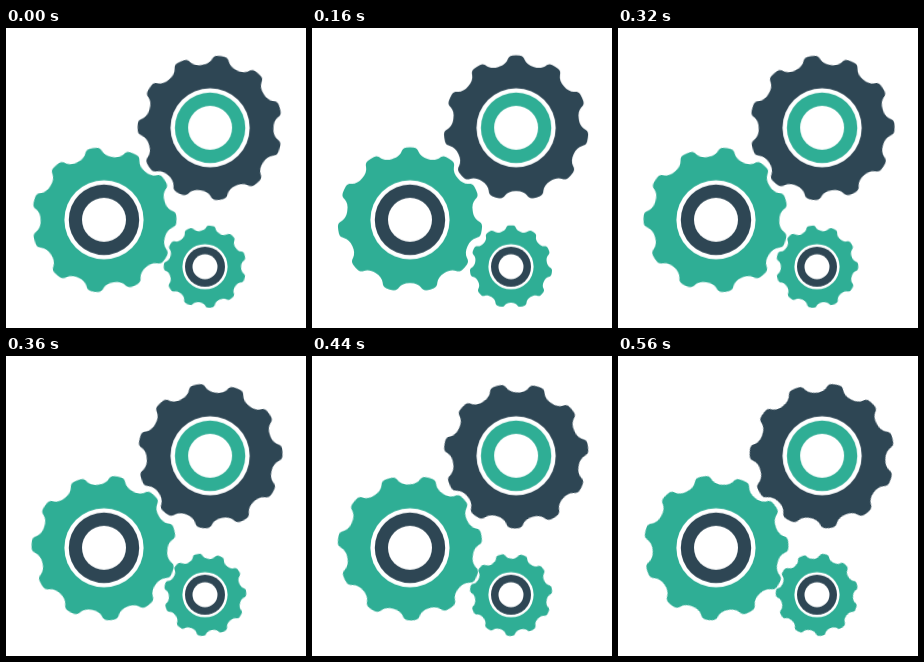
Write an HTML page that moves like this. It is 300x300 px and loops after 0.6 s.

```html
<!DOCTYPE html>
<html lang="en">
<head>
<meta charset="utf-8">
<title>Gears</title>
<style>
  html, body { margin: 0; width: 100%; height: 100%; overflow: hidden; background: #fff; }
  svg { display: block; width: 100vw; height: 100vh; }
  .wheel { transform-origin: 0 0; }
</style>
</head>
<body>
<svg id="stage" viewBox="0 0 300 300"></svg>
<script>
const DARK = '#2e4654', GREEN = '#2fae95', WHITE = '#fff';
const TEETH = 11, PITCH = 360 / TEETH, LOOP = 600, STEPS = 15;
const PHASE = PITCH * 4 / STEPS; // a tooth points straight up after four steps

const gears = [
  { x: 98, y: 191.8, r: 72.4, body: GREEN, ring: DARK, radii: [39.6, 35.2, 22], dir: 1 },
  { x: 204.1, y: 99.8, r: 72.4, body: DARK, ring: GREEN, radii: [39.6, 35.2, 22], dir: -1 },
  { x: 199, y: 238.7, r: 41.2, body: GREEN, ring: DARK, radii: [22.6, 20, 12.5], dir: -1 }
];

const stage = document.getElementById('stage');

function add(parent, tag, attrs) {
  const el = document.createElementNS('http://www.w3.org/2000/svg', tag);
  for (const key in attrs) el.setAttribute(key, attrs[key]);
  return parent.appendChild(el);
}

// Outline with rounded teeth and wide U-shaped valleys; the first tooth points up.
function gearPath(r) {
  let d = '';
  for (let i = 0; i < TEETH; i++) {
    const p = (k, deg) => {
      const a = (i * PITCH + deg) * Math.PI / 180;
      return (r * k * Math.sin(a)).toFixed(2) + ' ' + (-r * k * Math.cos(a)).toFixed(2);
    };
    d += (i ? 'L' : 'M') + p(1, -2.8) +
      'Q' + p(1.003, 0) + ' ' + p(1, 2.8) +
      'C' + p(0.997, 5.4) + ' ' + p(0.975, 6.2) + ' ' + p(0.945, 7.2) +
      'C' + p(0.905, 8.6) + ' ' + p(0.875, 12) + ' ' + p(0.875, PITCH / 2) +
      'C' + p(0.875, PITCH - 12) + ' ' + p(0.905, PITCH - 8.6) + ' ' + p(0.945, PITCH - 7.2) +
      'C' + p(0.975, PITCH - 6.2) + ' ' + p(0.997, PITCH - 5.4) + ' ' + p(1, PITCH - 2.8);
  }
  return d + 'Z';
}

for (const { x, y, r, body, ring, radii, dir } of gears) {
  const g = add(stage, 'g', { transform: `translate(${x} ${y})` });
  const wheel = add(g, 'path', { class: 'wheel', d: gearPath(r), fill: body });
  [WHITE, ring, WHITE].forEach((fill, i) => add(g, 'circle', { r: radii[i], fill }));

  const start = -dir * PHASE;
  wheel.animate(
    [{ transform: `rotate(${start}deg)` }, { transform: `rotate(${start + dir * PITCH}deg)` }],
    { duration: LOOP, iterations: Infinity, easing: `steps(${STEPS}, end)` }
  );
}
</script>
</body>
</html>
```
